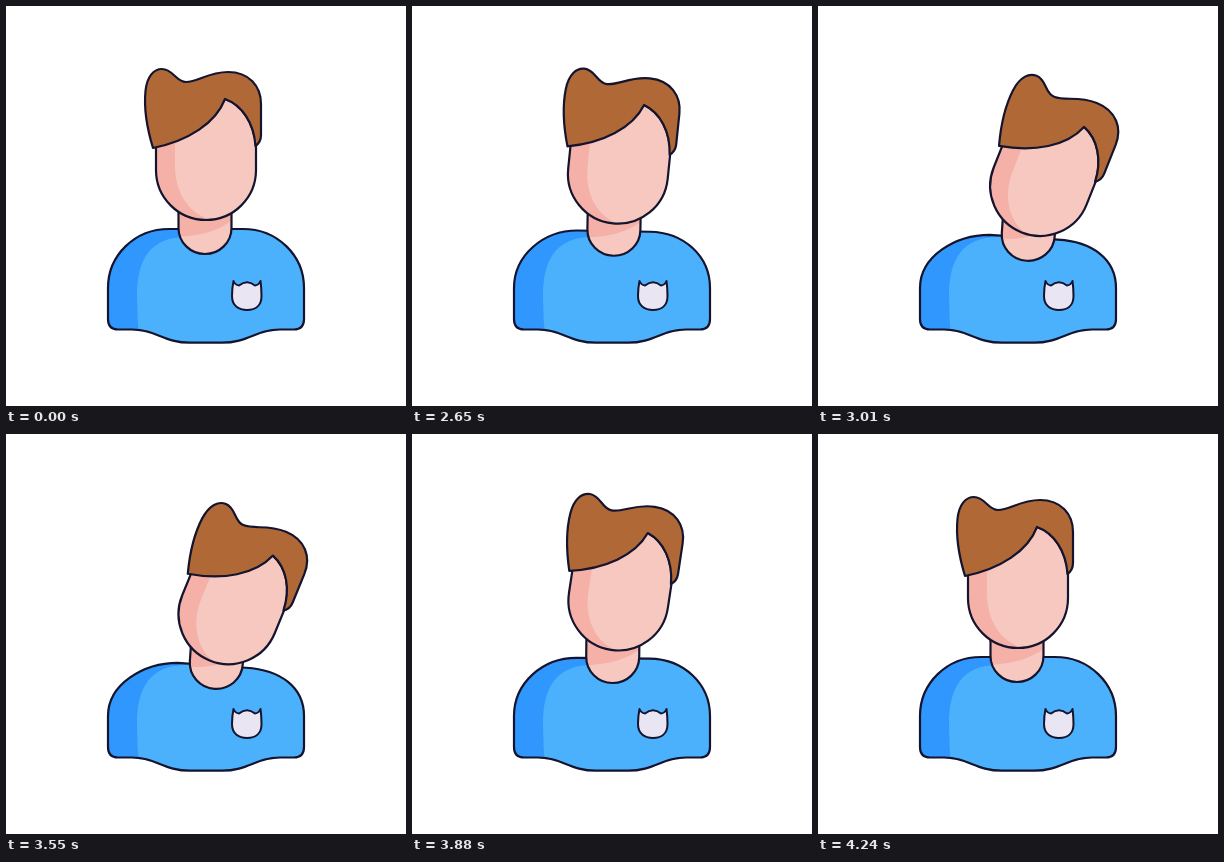
An HTML page that plays this animation: 400x400 px, repeating every 4330 ms.

```html
<!DOCTYPE html>
<html lang="en">
<head>
<meta charset="utf-8">
<title>Head tilt</title>
<style>
  html, body { margin: 0; width: 100%; height: 100%; overflow: hidden; background: #fff; }
  svg { display: block; width: 100%; height: 100%; }
  .line { fill: none; stroke: #14142e; stroke-width: 2.2; stroke-linejoin: round; stroke-linecap: round; }
  .skin { fill: #f6c8bf; }
  .blush { fill: #f5b1a8; }
</style>
</head>
<body>
<svg viewBox="0 0 400 400">
  <defs>
    <path id="torso"/>
    <path id="throat" d="M172.5 195V222A26.5 26 0 0 0 225.5 222V195Z"/>
    <path id="face" d="M150 135V164A50 50 0 0 0 250 164V140C248 117 236 99 219 93Z"/>
    <clipPath id="inTorso"><use href="#torso"/></clipPath>
    <clipPath id="inThroat"><use href="#throat"/></clipPath>
    <clipPath id="inFace"><use href="#face"/></clipPath>
  </defs>

  <use href="#torso" fill="#4bb1fc"/>
  <path fill="#2f97fd" clip-path="url(#inTorso)" d="M95 340H134Q131 315 131 290C131 254 144 231 180 231V210H95Z"/>
  <use href="#torso" class="line"/>
  <path class="line" style="fill:#e9e5f2;stroke-width:2" d="M227.500 275Q229 279 233 279.500Q241 273 249 279.500Q253 279 254.500 275Q255.500 282 255.500 290C255.500 300 249 304 241 304C233 304 226 300 226 290Q226 282 227.500 275Z"/>

  <g id="neck">
    <use href="#throat" class="skin"/>
    <g clip-path="url(#inThroat)">
      <path id="chin" class="blush" d="M170 180V231Q207 230 228 213V180Z"/>
    </g>
    <use href="#throat" class="line"/>
  </g>

  <g id="head">
    <use href="#face" class="skin"/>
    <path class="blush" clip-path="url(#inFace)" d="M145 90H169V160C169 185 182 209 207 214L200 220H145Z"/>
    <use href="#face" class="line"/>
    <path class="line" style="fill:#b06836" d="M147 142C140 119 138 100 139.500 85C141 70 148 63 156 63C167 63 170 76 180 76C192 76 202 66 222 66C243 66 255 80 255 98V129Q255 136 249.500 140C248 117 236 99 219 93C210 117 182 135 147 142Z"/>
  </g>
</svg>
<script>
const LOOP = 4330;
const el = id => document.getElementById(id);

// Cubic Bezier easing, solved by bisection
function ease(f, x1, y1, x2, y2) {
  if (f <= 0) return 0;
  if (f >= 1) return 1;
  const at = (s, a, b) => 3 * (1 - s) ** 2 * s * a + 3 * (1 - s) * s * s * b + s ** 3;
  let lo = 0, hi = 1;
  for (let i = 0; i < 24; i++) {
    const mid = (lo + hi) / 2;
    if (at(mid, x1, x2) < f) lo = mid; else hi = mid;
  }
  return at(lo, y1, y2);
}

const span = (t, from, to) => (t - from) / (to - from);

function draw(t) {
  // The shoulders lead on the way back, the head follows
  const lean = ease(span(t, 2500, 3130), .33, .03, .3, 1) - ease(span(t, 3500, 4130), .33, 0, .3, 1);
  const tilt = 22.2 * (ease(span(t, 2500, 3130), .33, .04, .28, 1) - ease(span(t, 3620, 4240), .33, 0, .3, 1));
  const dx = 10.3 * lean, dy = 7 * lean;

  const lx = 163 + 9 * lean, ly = 223 + 6 * lean;
  const rx = 237 + 3 * lean, ry = 223 + 11 * lean;
  el('torso').setAttribute('d',
    `M102 282C102 ${249 + lean} ${lx - 34} ${ly} ${lx} ${ly}L${rx} ${ry}` +
    `C${rx + 34} ${ry + 2 * lean} 298 ${249 + 4 * lean} 298 282V313Q298 323.500 288 323.500H274` +
    'C250 323.500 242 336.700 216 336.700H184C158 336.700 150 323.500 126 323.500H112Q102 323.500 102 313Z');
  el('neck').setAttribute('transform', `translate(${dx} ${dy}) rotate(${4 * lean} 199 240)`);
  el('chin').setAttribute('transform', `translate(0 ${-3 * lean})`);
  el('head').setAttribute('transform', `translate(${dx} ${2 * dy}) rotate(${tilt} 200 197)`);
}

const start = performance.now();
function tick() {
  draw((performance.now() - start) % LOOP);
  requestAnimationFrame(tick);
}
tick();
</script>
</body>
</html>
```
